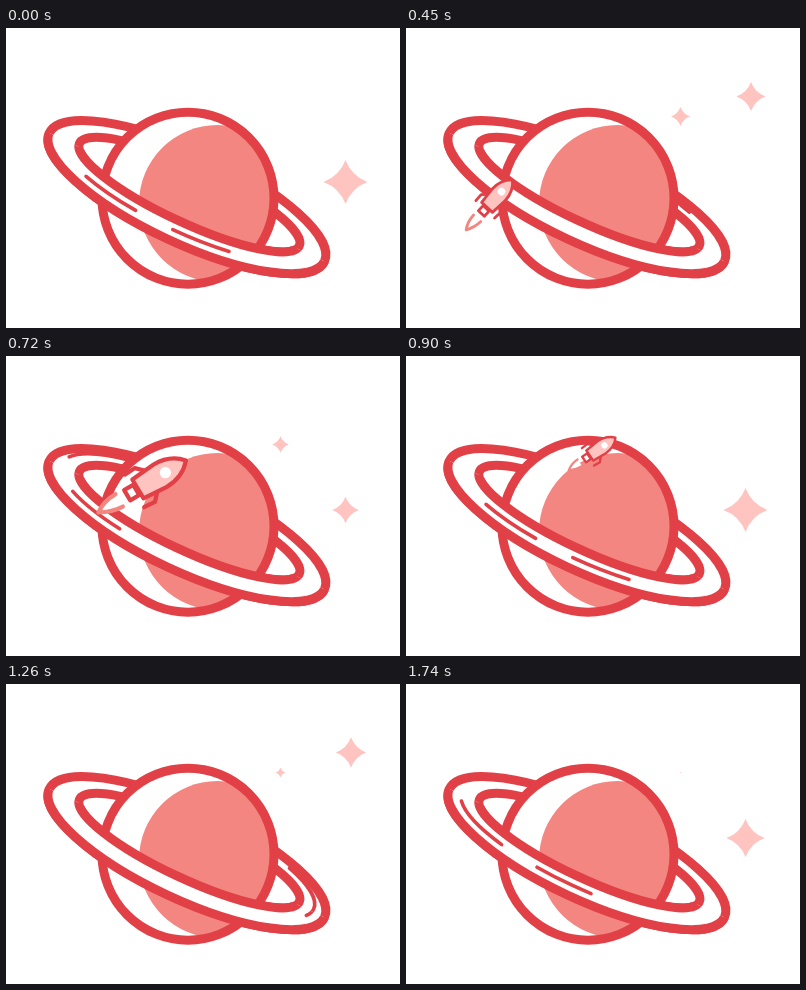
Recreate the animation shown at these times as an HTML page. Size 394 by 300 pixels, loop 1770 ms.

```html
<!DOCTYPE html>
<html lang="en">
<head>
<meta charset="utf-8">
<title>Ringed planet</title>
<style>
  html, body { margin: 0; width: 100%; height: 100%; overflow: hidden; background: #fff; }
  svg { display: block; width: 100%; height: 100%; }
  .line { stroke: #e14047; stroke-linecap: round; stroke-linejoin: round; }
  .pale { fill: #ffc3c0; }
</style>
</head>
<body>
<svg viewBox="0 0 394 300">
  <defs>
    <clipPath id="disc"><circle cx="182" cy="170.2" r="86"/></clipPath>
    <clipPath id="near"><rect x="-170" y="0" width="340" height="70"/></clipPath>

    <g id="ring">
      <path class="line" fill="#fff" fill-rule="evenodd" stroke-width="9"
        d="M-151.8 0a151.8 46.2 0 1 1 303.6 0a151.8 46.2 0 1 1-303.6 0z
           M-120.1-3.3a121.3 28.2 0 1 1 242.6 0a121.3 28.2 0 1 1-242.6 0z"/>
      <ellipse id="streaks" class="line" cx="-.5" cy="-3" rx="139" ry="38.4" fill="none"
        stroke-width="3.6" pathLength="591" stroke-dasharray="59 41 59 432"/>
    </g>

    <g id="rocket" class="line" stroke-width="4.2">
      <path d="M-46-7Q-60-7-70 0Q-58 7-46 7.5" fill="#fff" stroke="#f38680"/>
      <path d="M-9-12.5L-16-19.5L-28-19M-9 12.5L-16 20L-28 19" fill="none"/>
      <path d="M-26-6H-36.5V6H-26z" fill="#fff"/>
      <path class="pale" d="M-24-11L2-13C14-13 25-8 32 0C25 8 14 13 2 13L-24 11z"/>
      <circle cx="8" r="5.7" fill="#fff" stroke="none"/>
    </g>

    <path id="star" class="pale" d="M0-1Q.27-.27 1 0Q.27 .27 0 1Q-.27 .27-1 0Q-.27-.27 0-1z"/>
    <path id="route" d="M130 228C108 242 80 242 71.6 222S77.6 183.5 91 168.6
      S130 134 152 121S179 103 192.5 93.5S232 66 250 58"/>
  </defs>

  <g id="stars"></g>
  <use href="#ring" transform="translate(180.9 169.1) rotate(25)"/>
  <use href="#rocket" id="behind"/>
  <circle cx="182" cy="170.2" r="86" fill="#fff"/>
  <circle cx="211.5" cy="175.5" r="78.5" fill="#f38680" clip-path="url(#disc)"/>
  <circle class="line" cx="182" cy="170.2" r="86" fill="none" stroke-width="9"/>
  <g transform="translate(180.9 169.1) rotate(25)">
    <g clip-path="url(#near)"><use href="#ring"/></g>
  </g>
  <use href="#rocket" id="front"/>
</svg>
<script>
  const LOOP = 1770, TURN = 900, ORBIT = 591;
  const SPEED = .2845;                             // rocket, px per ms
  const EMERGE = 130, NEAREST = 720, GONE = 1130;  // rocket, ms

  const $ = id => document.getElementById(id);
  const streaks = $('streaks'), route = $('route'), behind = $('behind'), front = $('front');

  // Stars swell to size at the peak phase and fade away again
  const stars = [
    { x: 339.5, y: 154, size: 22, peak: 0, rise: .5, fall: .4 },
    { x: 345, y: 68.5, size: 17, peak: .45, rise: .45, fall: .35 },
    { x: 274.5, y: 88.5, size: 16.5, peak: .65, rise: .35, fall: .3 }
  ];
  for (const s of stars) {
    s.node = document.createElementNS('http://www.w3.org/2000/svg', 'use');
    s.node.setAttribute('href', '#star');
    $('stars').append(s.node);
  }

  function radius({ size, peak, rise, fall }, phase) {
    const since = (phase - peak + 1) % 1;
    return size * Math.max(0, 1 - since / fall, 1 - (1 - since) / rise);
  }

  function rocketPose(t) {
    const at = t * SPEED;
    const p = route.getPointAtLength(at);
    const a = route.getPointAtLength(at - 1), b = route.getPointAtLength(at + 1);
    const heading = Math.atan2(b.y - a.y, b.x - a.x) * 180 / Math.PI;
    const growth = 1 + (t - NEAREST) / 814;
    const shrink = (GONE - t) / (GONE - NEAREST);
    return `translate(${p.x} ${p.y}) rotate(${heading}) scale(${Math.min(growth, shrink)})`;
  }

  function draw(t) {
    const phase = t / TURN % 1;
    streaks.setAttribute('stroke-dashoffset', ORBIT * phase - 88);

    for (const s of stars)
      s.node.setAttribute('transform', `translate(${s.x} ${s.y}) scale(${radius(s, phase)})`);

    behind.style.display = t < EMERGE ? '' : 'none';
    front.style.display = t >= EMERGE && t < GONE ? '' : 'none';
    const pose = rocketPose(Math.min(t, GONE));
    behind.setAttribute('transform', pose);
    front.setAttribute('transform', pose);
  }

  const start = performance.now();
  function tick() {
    draw((performance.now() - start) % LOOP);
    requestAnimationFrame(tick);
  }
  tick();
</script>
</body>
</html>
```
